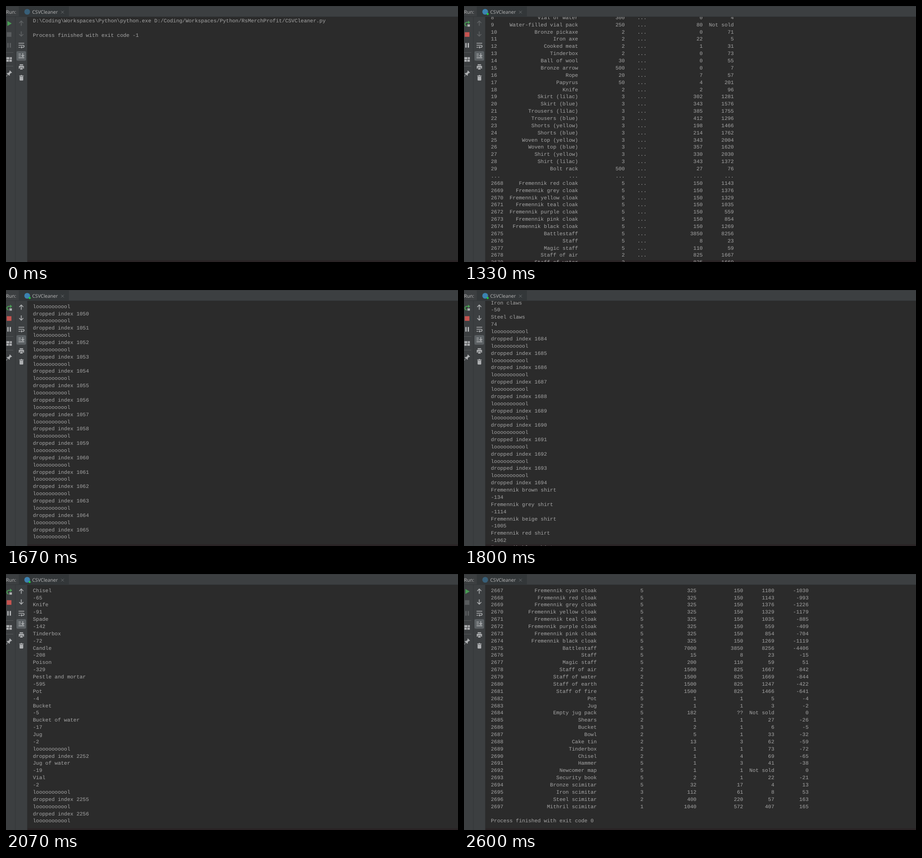
Recreate the animation shown at these times as an HTML page. Size 992 by 564 pixels, loop 4.34 s.

```html
<!DOCTYPE html>
<html lang="en">
<head>
<meta charset="utf-8">
<title>Console run</title>
<style>
  html, body { margin: 0; width: 100%; height: 100%; overflow: hidden; background: #2b2b2b; }
  svg { display: block; width: 992px; height: 564px; }
  text { white-space: pre; text-rendering: geometricPrecision; }
  .ui { font: 10.5px "Open Sans", "Noto Sans", sans-serif; fill: #bbb; }
  #console { font: 11.4px "Liberation Mono", "DejaVu Sans Mono", monospace; fill: #a6a6a6; }
  .line { fill: none; stroke-width: 1.7; }
  .thick { fill: none; stroke-width: 2.2; }
</style>
</head>
<body>
<svg viewBox="0 0 992 564">
  <clipPath id="pane"><rect x="47" y="24" width="945" height="540"/></clipPath>
  <rect width="992" height="564" fill="#2b2b2b"/>
  <rect x="47" y="560.5" width="945" height="3.5" fill="#2a2325"/>
  <g id="console" clip-path="url(#pane)"></g>

  <!-- header and tool strips -->
  <path d="M0 0H992V24H47V564H0Z" fill="#3c3f41"/>
  <path d="M0 .5H992M0 23.5H992M20.5 24V564M46.5 24V564" stroke="#323537"/>
  <rect x="28" y="1" width="110" height="23" fill="#333739"/>
  <text class="ui" x="0" y="17">Run:</text>
  <text class="ui" x="57.5" y="17">CSVCleaner</text>
  <path d="M121 10.5l6 6m0-6l-6 6" stroke="#6e7274"/>
  <circle id="badge" cx="46.5" cy="12.8" r="6.3"/>

  <g id="idle">
    <path d="M3 33L12.5 38.5L3 44Z" fill="#499c54"/>
    <path d="M1.7 57.7h10.2v10.2H1.7Z" fill="#5a5d5f"/>
  </g>
  <g id="running">
    <circle cx="52" cy="17.6" r="2.2" fill="#1fd83b"/>
    <path class="thick" d="M9.5 36H6.4A4 4 0 0 0 6 44" stroke="#499c54"/>
    <path d="M8.8 32L13.6 36L8.8 40Z" fill="#499c54"/>
    <path d="M7.5 40.5h5.5v5H7.5Z" fill="#afb1b3"/>
    <path d="M1.7 57.7h10.2v10.2H1.7Z" fill="#c75450"/>
  </g>
  <path id="pause" d="M2.8 81.5h3v10.3h-3ZM8 81.5h3v10.3H8Z"/>
  <path d="M0 102.5H16M0 132.5H16" stroke="#55585a"/>
  <g fill="#afb1b3">
    <path d="M1 112.8h6.5v4.4H1ZM8.6 112.8H12.8v4.4H8.6ZM1 118.3h5.2v4.4H1ZM7.3 118.3h5.5v4.4H7.3Z"/>
    <path d="M8.5 142l4.8 4.8-1.5 1-1-.3-2.6 2.7.2 2.4-1.2 1.1-2.6-2.6L1 155.5l-.7-.7 3.6-3.7-2.4-2.4 1.2-1.2 2.5.1 2.6-2.6-.4-1.4Z"/>
  </g>

  <g id="arrows" class="line">
    <path d="M33.5 43.5V33M29 37.5L33.5 33L38 37.5"/>
    <path d="M33.5 56V66.5M29 62L33.5 66.5L38 62"/>
  </g>
  <rect x="23" y="99.5" width="21" height="21" rx="3" fill="#5c6164"/>
  <g class="line" stroke="#afb1b3">
    <path d="M27.5 82H40M27.5 86.5H37.5A2.2 2.2 0 0 1 37.5 91H34.5M27.5 91H31"/>
    <path d="M27.5 106H32.5M27.5 110H32.5M27.5 114.2H40M36.8 104V111M33.8 108.5L36.8 111.5L39.8 108.5"/>
  </g>
  <g fill="#afb1b3">
    <path d="M34.8 88V94L31.8 91ZM30 128.5h7.5v2.5H30ZM28 132h11.5v6H37.5v-2.5H30v2.5H28ZM31 136.5h5.5v3.5H31Z"/>
    <path d="M29 153.3h3l.7-1.2h2.2l.7 1.2h3v1.4H29ZM29.8 155.6h8v7.6l-1 1h-6l-1-1Z"/>
  </g>
</svg>

<script>
const LOOP = 4340, PITCH = 15.865, LEFT = 59, BASELINE = 3.7;
const $ = id => document.getElementById(id);
const rows = text => text.trim().split("\n").map(r => r.split("|"));
const cloak = (color, price) => [`Fremennik ${color} cloak`, 5, 325, 150, price];
const staff = (kind, price) => [`Staff of ${kind}`, 2, 1500, 825, price];

// name | stock | sell | price, starting at index 8
const HEAD = rows(`
Vial of water|300|0|4
Water-filled vial pack|250|80|Not sold
Bronze pickaxe|2|0|71
Iron axe|2|22|5
Cooked meat|2|1|31
Tinderbox|2|0|73
Ball of wool|30|0|55
Bronze arrow|500|0|7
Rope|20|7|57
Papyrus|50|4|201
Knife|2|2|96
Skirt (lilac)|3|302|1281
Skirt (blue)|3|343|1576
Trousers (lilac)|3|385|1755
Trousers (blue)|3|412|1296
Shorts (yellow)|3|198|1466
Shorts (blue)|3|214|1762
Woven top (yellow)|3|343|2004
Woven top (blue)|3|357|1620
Shirt (yellow)|3|330|2030
Shirt (lilac)|3|343|1372
Bolt rack|500|27|76`);

// name | stock | value | sell | price
const TAIL_START = 2665;
const TAIL = [
  cloak("brown", 1204), cloak("blue", 1152), cloak("cyan", 1180), cloak("red", 1143),
  cloak("grey", 1376), cloak("yellow", 1329), cloak("teal", 1035), cloak("purple", 559),
  cloak("pink", 854), cloak("black", 1269),
  ...rows(`
Battlestaff|5|7000|3850|8256
Staff|5|15|8|23
Magic staff|5|200|110|59`),
  staff("air", 1667), staff("water", 1669), staff("earth", 1247), staff("fire", 1466),
  ...rows(`
Pot|5|1|1|5
Jug|2|1|1|3
Empty jug pack|5|182|??|Not sold
Shears|2|1|1|27
Bucket|3|2|1|6
Bowl|2|5|1|33
Cake tin|2|13|3|62
Tinderbox|2|1|1|73
Chisel|2|1|4|69
Hammer|5|1|3|41
Newcomer map|5|1|1|Not sold
Security book|5|2|1|22
Bronze scimitar|5|32|17|4
Iron scimitar|3|112|61|8
Steel scimitar|2|400|220|57
Mithril scimitar|1|1040|572|407`)];

const columns = (index, cells, widths) =>
  String(index).padEnd(4) + cells.map((c, i) => String(c).padStart(widths[i])).join("");
const shortRow = (index, name, stock, sell, price) =>
  columns(index, [name, stock, "...", sell, price], [24, 15, 7, 18, 10]);
const profit = ([, , , sell, price]) => price === "Not sold" ? 0 : sell - price;

const shortTable = [
  ...HEAD.map((r, i) => shortRow(8 + i, ...r)),
  shortRow("...", "...", "...", "...", "..."),
  ...TAIL.slice(3, 15).map(([name, stock, , sell, price], i) =>
    shortRow(2668 + i, name, stock, sell, price))];
const fullTable = TAIL.map((r, i) =>
  columns(TAIL_START + i, [...r, profit(r)], [30, 15, 17, 15, 10, 11]));

// items kept by the cleaner; every other index is dropped
const kept = new Map();
const keep = (start, list) => list.split(",").forEach((item, i) => {
  if (item) kept.set(start + i, item.split(":"));
});
keep(1682, "Iron claws:-50,Steel claws:74");
keep(1695, "Fremennik brown shirt:-134,Fremennik grey shirt:-1114,Fremennik beige shirt:-1005,Fremennik red shirt:-1062,Fremennik blue shirt:-1021");
keep(2241, "Chisel:-65,Knife:-91,Spade:-142,Tinderbox:-72,Candle:-208,Poison:-329,Pestle and mortar:-595,Pot:-4,Bucket:-5,Bucket of water:-17,Jug:-2,,Jug of water:-19,Vial:-2");
TAIL.forEach((r, i) => {
  if (r[4] !== "Not sold") kept.set(TAIL_START + i, [r[0], profit(r)]);
});

// each index prints two lines
function logLine(n) {
  const index = n >> 1, item = kept.get(index);
  if (item) return String(item[n & 1]);
  return n & 1 ? "dropped index " + index : "l" + "o".repeat(10) + "l";
}
const log = (first, count = 33) => Array.from({ length: count }, (_, i) => logLine(first + i));

const command = "D:\\Coding\\Workspaces\\Python\\python.exe D:/Coding/Workspaces/Python/RsMerchProfit/CSVCleaner.py";
const finished = code => ["", "Process finished with exit code " + code];

// [start ms, lines, centre of first line, running, arrows lit]
const scrolled = (time, first) => [time, log(first), 36, true, true];
const STEPS = [
  [0, [command, ...finished(-1)], 32.2, false, false],
  [670, [command], 32.2, true, false],
  [1330, shortTable, 25.2, true, false],
  scrolled(1400, 60),
  scrolled(1470, 480),
  [1530, log(937, 35), 28.7, true, true],
  scrolled(1600, 1500),
  scrolled(1670, 2100),
  scrolled(1730, 2740),
  [1800, log(3364, 35), 27.9, true, true],
  scrolled(1870, 3650),
  scrolled(1930, 3930),
  scrolled(2000, 4200),
  scrolled(2070, 4482),
  scrolled(2130, 4720),
  scrolled(2200, 5020),
  scrolled(2270, 5363),
  [2400, fullTable, 36, true, true],
  [2530, [...fullTable.slice(2), ...finished(0)], 36, true, true],
  [2600, [...fullTable.slice(2), ...finished(0)], 36, false, true]];

const slots = Array.from({ length: 35 }, () => {
  const node = document.createElementNS("http://www.w3.org/2000/svg", "text");
  node.setAttribute("x", LEFT);
  return $("console").appendChild(node);
});

let shown;
function render(time) {
  const step = STEPS.findLast(s => s[0] <= time);
  if (step === shown) return;
  shown = step;
  const [, lines, top, running, lit] = step;
  slots.forEach((node, i) => {
    node.textContent = lines[i] || "";
    node.setAttribute("y", top + BASELINE + i * PITCH);
  });
  $("running").setAttribute("display", running ? "inline" : "none");
  $("idle").setAttribute("display", running ? "none" : "inline");
  $("badge").setAttribute("fill", running ? "#3c82b0" : "#385f78");
  $("pause").setAttribute("fill", running ? "#afb1b3" : "#5a5d5f");
  $("arrows").setAttribute("stroke", lit ? "#afb1b3" : "#5f6264");
}

const start = performance.now();
function tick() {
  render((performance.now() - start) % LOOP);
  requestAnimationFrame(tick);
}
tick();
</script>
</body>
</html>
```
